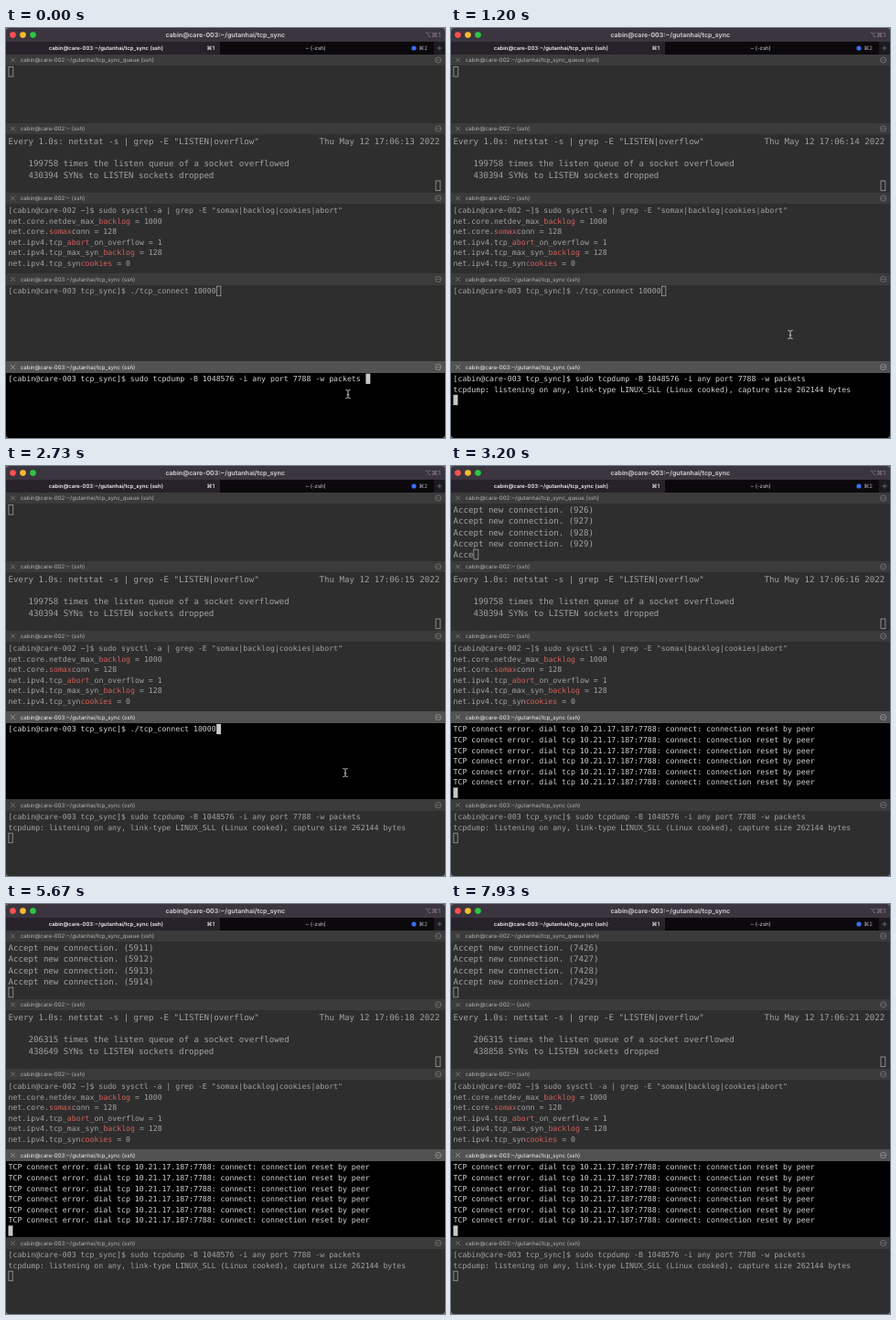
Recreate the animation shown at these times as an HTML page with a canvas. Size 480 by 448 pixels, loop 8 s.

```html
<!DOCTYPE html>
<html lang="en">
<head>
<meta charset="utf-8">
<title>Terminal session</title>
<style>
html, body { margin: 0; width: 480px; height: 448px; overflow: hidden; background: #000; }
canvas { display: block; }
</style>
</head>
<body>
<canvas id="stage" width="480" height="448"></canvas>
<script>
const ctx = document.getElementById('stage').getContext('2d');
ctx.textRendering = 'geometricPrecision';

const LOOP = 8000, FPS = 15;
const UI = 'Inter, "DejaVu Sans", sans-serif';
const MONO = '"DejaVu Sans Mono", monospace';
const LEFT = 2.5;
const BIG = { size: 9.127, cell: 5.495, row: 12.2, base: 9.2, height: 11.5 };
const SMALL = { size: 8.218, cell: 4.948, row: 11.6, base: 8.5, height: 11.3 };
const DIM = '#a2a2a2', LIT = '#d2d2d2', RED = '#d0605c';

const USER = 'cabin', HOME = '~/gutanhai';
const HOST2 = USER + '@care-002:', HOST3 = USER + '@care-003:';
const SYNC = HOST3 + HOME + '/tcp_sync';
const PROMPT = `[${USER}@care-003 tcp_sync]$ `;
const ERROR = 'TCP connect error. dial tcp 10.21.17.187:7788: connect: connection reset by peer';

const ENTER_DUMP = 200, DUMP_READY = 330, FOCUS = 1270, ENTER_CONNECT = 2930, ERRORS = 3070;

// bursts of new connections: first step, last step, gain
const BURSTS = [
  [44, 48, 929], [48, 51, 2567], [59, 62, 913], [62, 66, 1212],
  [78, 81, 255], [84, 85, 38], [93, 97, 1274], [108, 119, 241]
];

const clamp = v => Math.min(1, Math.max(0, v));
const stepAt = t => Math.floor(t * FPS / 1000 + 0.1);
const secondAt = t => 13 + Math.floor((t + 200) / 985);

function acceptedAt(t) {
  const s = stepAt(t);
  return BURSTS.reduce((sum, [a, b, gain]) => sum + Math.round(gain * clamp((s - a) / (b - a))), 0);
}

function rect(x, y, w, h, color) {
  ctx.fillStyle = color;
  ctx.fillRect(x, y, w, h);
}

function dot(x, y, r, color) {
  ctx.fillStyle = color;
  ctx.beginPath();
  ctx.arc(x, y, r, 0, Math.PI * 2);
  ctx.fill();
}

function stroke(color, width, ...lines) {
  ctx.strokeStyle = color;
  ctx.lineWidth = width;
  ctx.beginPath();
  for (const [x1, y1, x2, y2] of lines) {
    ctx.moveTo(x1, y1);
    ctx.lineTo(x2, y2);
  }
  ctx.stroke();
}

function write(text, x, y, font, color, align = 'left') {
  ctx.font = font;
  ctx.textAlign = align;
  ctx.fillStyle = color;
  ctx.fillText(text, x, y);
}

function label(text, x, y, size, color, weight = 400, align = 'left') {
  write(text, x, y, `${weight} ${size}px ${UI}`, color, align);
}

function windowBar() {
  rect(0, 0, 480, 15, '#3a353f');
  ['#fd504e', '#f8bb30', '#2cc741'].forEach((c, i) => dot(7.5 + i * 11, 7.6, 3.3, c));
  label(SYNC, 239.8, 10, 6.95, '#c9c7ca', 700, 'center');
  label('⌥⌘1', 475, 9.5, 7, '#8d8991', 400, 'right');

  rect(0, 15, 234, 14, '#272229');
  rect(234, 15, 246, 14, '#0b090c');
  rect(468, 15, 12, 14, '#1d1a20');
  label(SYNC + ' (ssh)', 109.3, 24.2, 5.9, '#f0f0f0', 600, 'center');
  label('⌘1', 228, 24.2, 6, '#e6e6e6', 600, 'right');
  label('~ (-zsh)', 338.5, 24.2, 5.9, '#b4b2b6', 500, 'center');
  dot(446, 22, 2.6, '#3b6df0');
  label('⌘2', 461, 24.2, 6, '#a9a7ab', 400, 'right');
  stroke('#77747a', 0.8, [471.5, 22, 476.5, 22], [474, 19.5, 474, 24.5]);
}

function header(y, height, title, active) {
  rect(0, y, 480, height, active ? '#525252' : '#3b3b3b');
  const mid = y + height / 2, color = active ? '#a8a8a8' : '#858585';
  stroke(color, 0.8, [5.2, mid - 2.3, 9.8, mid + 2.3], [9.8, mid - 2.3, 5.2, mid + 2.3]);
  label(title, 15.7, mid + 2.1, 6.1, active ? '#f0f0f0' : '#b2b2b2');
  ctx.strokeStyle = color;
  ctx.lineWidth = 0.7;
  ctx.beginPath();
  ctx.arc(472.6, mid, 3.1, 0, Math.PI * 2);
  ctx.stroke();
  for (const dx of [-1.5, 0, 1.5]) dot(472.6 + dx, mid, 0.5, color);
}

// cursor is [column, row]; marks is a pattern shown in red after the first row
function pane({ y, end, bar = 12, title, top, type, rows, cursor, active, marks }) {
  rect(0, y, 480, end - y, active ? '#000' : '#2e2e2e');
  header(y, bar, title, active);
  const font = `${type.size}px ${MONO}`;
  rows.forEach((text, r) => {
    const base = top + type.base + r * type.row;
    const parts = marks && r ? text.split(marks) : [text];
    let col = 0;
    parts.forEach((part, i) => {
      write(part, LEFT + col * type.cell, base, font, i % 2 ? RED : active ? LIT : DIM);
      col += part.length;
    });
  });
  if (!cursor) return;
  const x = LEFT + cursor[0] * type.cell, cy = top + cursor[1] * type.row;
  if (active) {
    rect(x, cy, type.cell, type.height, '#c8c8c8');
  } else {
    ctx.strokeStyle = '#a0a0a0';
    ctx.lineWidth = 0.8;
    ctx.strokeRect(x + 0.4, cy + 0.4, type.cell - 0.6, type.height - 0.8);
  }
}

function acceptRows(t) {
  const n = acceptedAt(t);
  if (!n) return [''];
  const rows = [3, 2, 1, 0].map(k => `Accept new connection. (${n - k})`);
  return [...rows, stepAt(t) === BURSTS[1][0] ? 'Acce' : ''];
}

function pointer(t) {
  if (t >= ENTER_CONNECT) return;
  const p = clamp((t - 500) / 650);
  const e = p * p * (3 - 2 * p);
  const x = 374 - 3 * e, y = 400 - 65 * e;
  stroke('#c4c4c4', 1, [x, y - 4, x, y + 4], [x - 1.3, y + 0.8, x + 1.3, y + 0.8]);
  for (const side of [-1, 1]) {
    stroke('#c4c4c4', 1,
      [x - 2.6, y + 4.6 * side, x - 0.3, y + 4 * side],
      [x + 2.6, y + 4.6 * side, x + 0.3, y + 4 * side]);
  }
}

function corners() {
  ctx.fillStyle = '#777';
  ctx.beginPath();
  ctx.rect(0, 0, 480, 448);
  ctx.roundRect(0, 0, 480, 448, 4);
  ctx.fill('evenodd');
}

function draw(t) {
  windowBar();

  const accepts = acceptRows(t), last = accepts.length - 1;
  pane({
    y: 29, end: 104, title: HOST2 + HOME + '/tcp_sync_queue (ssh)', top: 42, type: BIG,
    rows: accepts, cursor: [accepts[last].length, last]
  });

  const sec = secondAt(t);
  const overflows = sec < 17 ? 199758 : sec < 18 ? 206262 : 206315;
  const drops = sec < 17 ? 430394 : sec < 18 ? 436898 : sec < 20 ? 438649 : 438858;
  const watch = 'Every 1.0s: netstat -s | grep -E "LISTEN|overflow"';
  pane({
    y: 104, end: 180, title: HOST2 + '~ (ssh)', top: 117.8, type: BIG,
    rows: [
      watch.padEnd(62) + `Thu May 12 17:06:${sec} 2022`,
      '',
      `    ${overflows} times the listen queue of a socket overflowed`,
      `    ${drops} SYNs to LISTEN sockets dropped`
    ],
    cursor: [85, 4]
  });

  pane({
    y: 180, end: 268, title: HOST2 + '~ (ssh)', top: 193.4, type: SMALL,
    marks: /(somax|backlog|cookies|abort)/,
    rows: [
      `[${USER}@care-002 ~]$ sudo sysctl -a | grep -E "somax|backlog|cookies|abort"`,
      'net.core.netdev_max_backlog = 1000',
      'net.core.somaxconn = 128',
      'net.ipv4.tcp_abort_on_overflow = 1',
      'net.ipv4.tcp_max_syn_backlog = 128',
      'net.ipv4.tcp_syncookies = 0'
    ]
  });

  const connect = PROMPT + './tcp_connect 10000';
  const failed = t >= ERRORS;
  pane({
    y: 268, end: 364, bar: 13, title: SYNC + ' (ssh)', top: 281.8, type: SMALL, active: t >= FOCUS,
    rows: failed ? Array(6).fill(ERROR) : [connect],
    cursor: failed ? [0, 6] : t >= ENTER_CONNECT ? [0, 1] : [connect.length, 0]
  });

  const dump = PROMPT + 'sudo tcpdump -B 1048576 -i any port 7788 -w packets ';
  const ready = t >= DUMP_READY;
  const rows = [dump];
  if (ready) rows.push('tcpdump: listening on any, link-type LINUX_SLL (Linux cooked), capture size 262144 bytes');
  pane({
    y: 364, end: 448, bar: 13, title: SYNC + ' (ssh)', top: 377.6, type: SMALL, active: t < FOCUS,
    rows, cursor: ready ? [0, 2] : t >= ENTER_DUMP ? [0, 1] : [dump.length, 0]
  });

  pointer(t);
  corners();
}

const start = performance.now();
function frame() {
  draw((performance.now() - start) % LOOP);
  requestAnimationFrame(frame);
}
frame();
</script>
</body>
</html>
```
